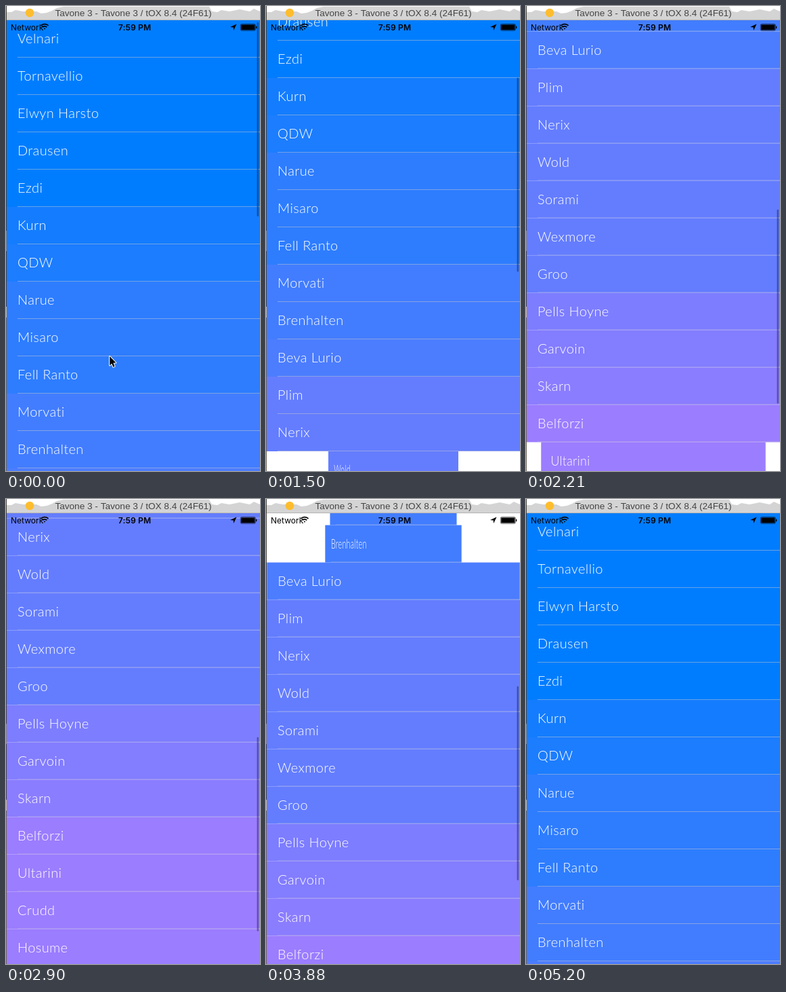
Recreate the animation shown at these times as an HTML page with a canvas. Size 375 by 685 pixels, loop 6.51 s.

```html
<!DOCTYPE html>
<html lang="en">
<head>
<meta charset="utf-8">
<title>List scroll</title>
<style>
  html, body { margin: 0; width: 100%; height: 100%; overflow: hidden; background: #fff; }
  canvas { display: block; }
</style>
</head>
<body>
<canvas id="stage" width="375" height="685"></canvas>
<script>
const ctx = document.getElementById('stage').getContext('2d');
const LOOP = 6510, TOP = 21, BOTTOM = 685, ROW = 55, MID = 188, WIDTH = 374;

const names = ['Velnari', 'Tornavellio', 'Elwyn Harsto', 'Drausen', 'Ezdi', 'Kurn', 'QDW',
  'Narue', 'Misaro', 'Fell Ranto', 'Morvati', 'Brenhalten', 'Beva Lurio', 'Plim', 'Nerix',
  'Wold', 'Sorami', 'Wexmore', 'Groo', 'Pells Hoyne', 'Garvoin', 'Skarn', 'Belforzi',
  'Ultarini', 'Crudd', 'Hosume', 'Zelkin'];

// [first row, red level]: the blue turns violet in steps
const shades = [[0, 0], [5, 20], [6, 28], [7, 46], [10, 66], [12, 76], [13, 100],
  [19, 125], [20, 131], [21, 139], [22, 155]];
const rowColor = i => `rgb(${shades.filter(s => s[0] <= i).pop()[1]},125,255)`;

// Finger drags as [ms, offset, px per second]
const dragUp = [[1100, 0, 0], [1315, 108, 450], [1475, 160, 1000], [1500, 190, 1175]];
const dragDown = [[3380, 787.9, 32], [3693, 715, -100], [3823, 662, -1200], [3862.5, 587.5, -1813]];

function along(keys, t) {
  const i = keys.findIndex(k => k[0] >= t);
  const [t0, p0, v0] = keys[i - 1], [t1, p1, v1] = keys[i];
  const d = (t1 - t0) / 1000, u = (t - t0) / (t1 - t0), w = 1 - u;
  return p0 + (p1 - p0) * u * u * (3 - 2 * u) + d * u * w * (v0 * w - v1 * u);
}

// Drag, decaying fling, drag back, fling to the top, spring bounce
function scrollAt(t) {
  if (t <= 1100) return 0;
  if (t <= 1500) return along(dragUp, t);
  if (t <= 3380) return 804.8 - 614.8 * Math.exp(-1.911 * (t - 1500) / 1000);
  if (t <= 3862.5) return along(dragDown, t);
  if (t <= 4385.3) return 587.5 - 906 * (1 - Math.exp(-2 * (t - 3862.5) / 1000));
  const s = (t - 4385.3) / 1000;
  return -637 * s * Math.exp(-13.5 * s);
}

const rowTop = (i, scroll) => TOP + ROW * i - scroll;
const visible = (i, t) => {
  const y = rowTop(i, scrollAt(t));
  return y < BOTTOM && y + ROW > TOP;
};

// A row widens from half size just after it comes into view
function rowScale(i, t) {
  for (let age = 0; age < 175; age += 2) {
    if (!visible(i, t - age)) {
      const u = Math.max(0, (age - 10) / 165);
      return 0.5 + 0.5 * u * u * (3 - 2 * u);
    }
  }
  return 1;
}

function rect(color, x, y, w, h) {
  ctx.fillStyle = color;
  ctx.fillRect(x, y, w, h);
}

function polygon(color, points) {
  ctx.beginPath();
  points.forEach(p => ctx.lineTo(...p));
  ctx.closePath();
  ctx.fillStyle = color;
  ctx.fill();
}

function text(str, x, y, font, color, align = 'left', spacing = 0) {
  ctx.font = font;
  ctx.textAlign = align;
  ctx.letterSpacing = spacing + 'px';
  ctx.fillStyle = color;
  ctx.fillText(str, x, y);
}

function drawRow(i, t, y) {
  ctx.save();
  ctx.translate(MID, y);
  ctx.scale(rowScale(i, t), 1);
  ctx.translate(-WIDTH / 2, 0);
  rect(rowColor(i), 0, 0, WIDTH, ROW);
  rect('rgba(200,199,204,.5)', 16, ROW - 1, WIDTH - 16, 1);
  text(names[i], 16, 34, '300 20px Lato, sans-serif', '#fff', 'left', 0.4);
  ctx.restore();
}

function drawList(t) {
  const scroll = Math.round(scrollAt(t) * 2) / 2;
  ctx.save();
  ctx.beginPath();
  ctx.rect(1, TOP, WIDTH, BOTTOM - TOP);
  ctx.clip();
  names.forEach((_, i) => {
    if (visible(i, t)) drawRow(i, t, rowTop(i, scroll));
  });
  ctx.restore();

  const fadeStart = t < 1100 ? 625 : 4912;
  const alpha = 0.35 * Math.min(1, Math.max(0, 1 - (t - fadeStart) / 262));
  ctx.beginPath();
  ctx.roundRect(370.5, 24 + 0.4286 * Math.max(0, scroll), 2.5, 286 + Math.min(0, scroll), 1.25);
  ctx.fillStyle = `rgba(0,0,0,${alpha})`;
  ctx.fill();
}

function drawStatus() {
  text('Network', 7, 35.5, '12px Inter, sans-serif', '#000');
  text('7:59 PM', 190, 35.5, '600 12px Inter, sans-serif', '#000', 'center', 0.2);

  ctx.strokeStyle = '#000';
  ctx.lineWidth = 1.8;
  [1, 4.6, 7.8].forEach(r => {
    ctx.beginPath();
    ctx.arc(57, 34.5, r, -Math.PI * 0.75, -Math.PI * 0.25);
    ctx.stroke();
  });

  polygon('#000', [[340.5, 26.5], [331, 31], [335.7, 31.4], [336, 36]]);

  ctx.lineWidth = 0.6;
  ctx.beginPath();
  ctx.roundRect(346.3, 26.6, 22, 9.6, 1.8);
  ctx.stroke();
  rect('#000', 347.2, 27.5, 20.2, 7.8);
  rect('#000', 369, 29.7, 1.2, 3.4);
}

function drawTitle() {
  rect('#fff', 0, 0, 375, TOP);
  polygon('#d4d4d4', [[0, 9], [8, 9], [14, 6], [25, 8], [45, 8], [52, 11], [60, 10], [68, 7],
    [75, 3], [85, 1], [300, 1], [304, 8], [312, 9], [318, 6], [330, 8], [345, 5], [360, 8],
    [366, 4], [375, 8], [375, TOP], [0, TOP]]);
  rect('#b4b4b4', 0, TOP - 1, 375, 1);
  ctx.beginPath();
  ctx.arc(35, 10, 6.3, 0, 7);
  ctx.fillStyle = '#fdbd2f';
  ctx.fill();
  text('Tavone 3 - Tavone 3 / tOX 8.4 (24F61)', MID, 15,
    '13.6px "Liberation Sans", sans-serif', '#444', 'center');
}

function drawEdge() {
  rect('#45423c', 0, 0, 1, 685);
  rect('#8a8378', 0, 331, 1, 30);
  rect('#c9b48c', 0, 443, 1, 16);
  rect('#6e6455', 0, 459, 1, 226);
}

function drawCursor() {
  ctx.save();
  ctx.translate(153, 516);
  ctx.lineWidth = 2;
  ctx.lineJoin = 'round';
  ctx.strokeStyle = '#fff';
  polygon('#000', [[0, 0], [0, 13.5], [3.2, 10.7], [5.3, 15.8], [7.5, 14.9], [5.4, 9.8], [9.4, 9.6]]);
  ctx.stroke();
  ctx.fill();
  ctx.restore();
}

function draw(now) {
  const t = now % LOOP;
  // The motion is seen in even steps of 87.5 ms
  const step = 1150 + 87.5 * Math.floor((t - 1148) / 87.5);
  rect('#fff', 0, 0, 375, 685);
  drawList(step);
  drawTitle();
  drawEdge();
  drawStatus();
  if (step < 1100) drawCursor();
}

const start = performance.now();
function frame() {
  draw(performance.now() - start);
  requestAnimationFrame(frame);
}
frame();
</script>
</body>
</html>
```
